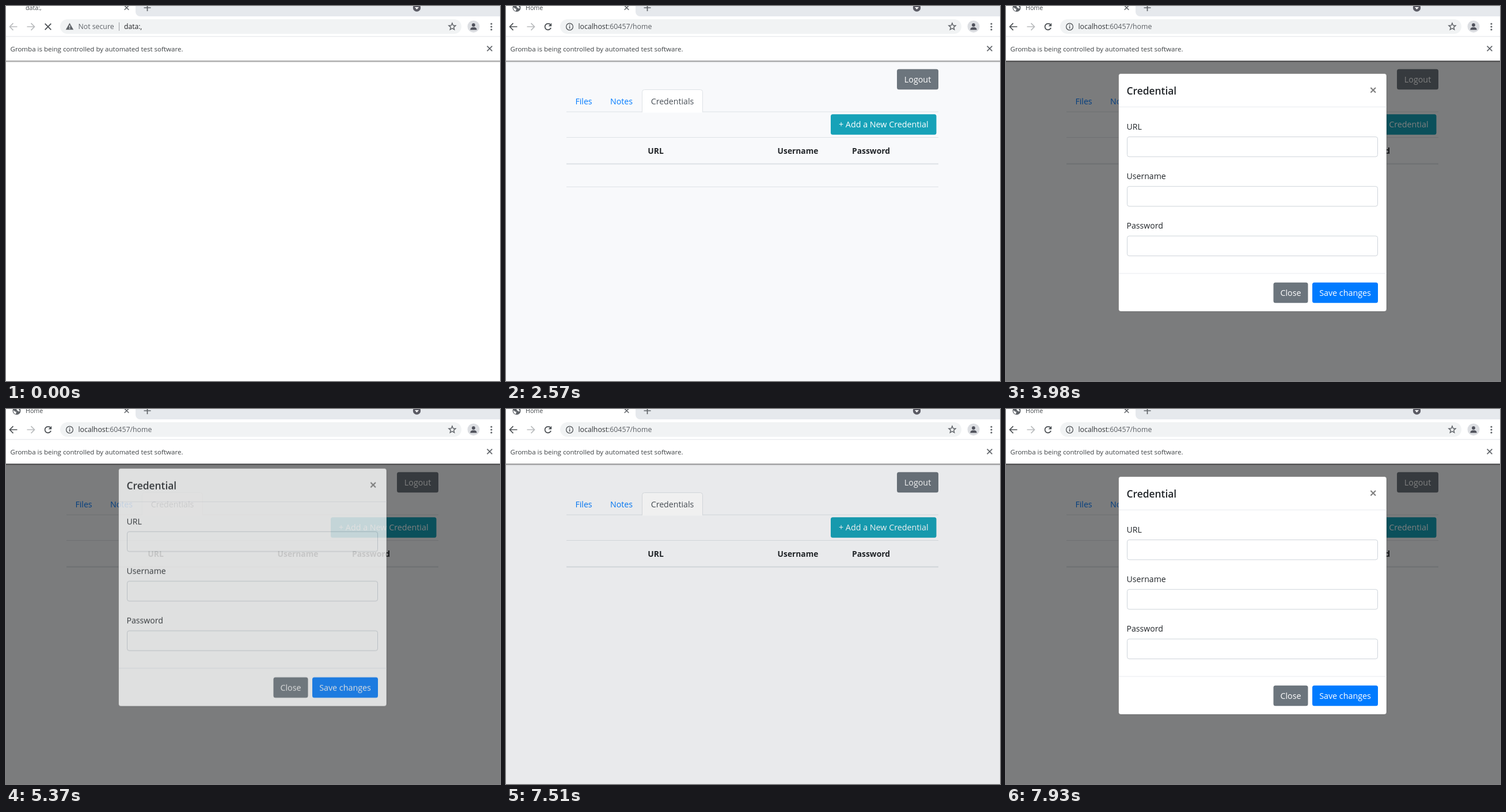
Animation of 858 by 652 pixels, one loop 8 s. Source, as an HTML page with a canvas:

```html
<!DOCTYPE html>
<html lang="en">
<head>
<meta charset="utf-8">
<title>Credentials test run</title>
<style>
html, body { margin: 0; width: 100%; height: 100%; overflow: hidden; background: #fff; }
canvas { display: block; }
</style>
</head>
<body>
<canvas id="stage" width="858" height="652"></canvas>
<script>
const c = document.getElementById('stage').getContext('2d');
const LOOP = 8000;
const FAMILY = '"Open Sans", "Noto Sans", sans-serif';
const INK = '#212529', ICON = '#5f6368', LINE = '#dee2e6', BLUE = '#007bff';

const clamp = v => Math.max(0, Math.min(1, v));
const easeOut = p => 1 - Math.pow(1 - p, 1.8);

function text(s, x, y, size = 14.3, color = INK, weight = 400, align = 'left') {
  c.font = `${weight} ${size}px ${FAMILY}`;
  c.fillStyle = color;
  c.textAlign = align;
  c.fillText(s, x, y);
}

function rect(x, y, w, h, color) {
  c.fillStyle = color;
  c.fillRect(x, y, w, h);
}

function box(x, y, w, h, r, fill, border) {
  c.beginPath();
  c.roundRect(x, y, w, h, r);
  if (fill) { c.fillStyle = fill; c.fill(); }
  if (border) { c.strokeStyle = border; c.lineWidth = 1; c.stroke(); }
}

function disc(x, y, r, color) {
  c.beginPath();
  c.arc(x, y, r, 0, 7);
  c.fillStyle = color;
  c.fill();
}

// Each path is a flat list: x, y, x, y, ...
function stroke(color, width, ...paths) {
  c.strokeStyle = color;
  c.lineWidth = width;
  c.beginPath();
  for (const p of paths)
    for (let i = 0; i < p.length; i += 2) c[i ? 'lineTo' : 'moveTo'](p[i], p[i + 1]);
  c.stroke();
}

function cross(x, y, r, width, color = ICON) {
  stroke(color, width, [x - r, y - r, x + r, y + r], [x - r, y + r, x + r, y - r]);
}

function button(label, x, y, w, color) {
  box(x, y, w, 35.5, 3.5, color);
  text(label, x + w / 2, y + 23, 14.3, '#fff', 400, 'center');
}

function field(x, y, w, focus) {
  if (focus) box(x - 3, y - 3, w + 6, 41.5, 6, 'rgba(0,123,255,.25)');
  box(x + .5, y + .5, w - 1, 34.5, 3.5, '#fff', focus ? '#80bdff' : '#ced4da');
}

function arrow(x, dir, color) {
  stroke(color, 1.7, [x - 6.5, 36, x + 6.5, 36], [x + dir * .5, 29.8, x + dir * 6.5, 36, x + dir * .5, 42.2]);
}

function globe() {
  disc(18.5, 3, 7, ICON);
  c.fillStyle = '#fff';
  c.beginPath();
  c.moveTo(13, 2);
  c.quadraticCurveTo(15, 5, 18, 5);
  c.lineTo(17, 9);
  c.quadraticCurveTo(12, 7, 13, 2);
  c.moveTo(18, 0);
  c.lineTo(22, 0);
  c.lineTo(24, 4);
  c.quadraticCurveTo(20, 5, 18, 0);
  c.fill();
}

function star(x, y) {
  c.beginPath();
  for (let i = 0; i < 10; i++) {
    const r = i % 2 ? 2.8 : 6.3, a = i * Math.PI / 5 - Math.PI / 2;
    c.lineTo(x + r * Math.cos(a), y + r * Math.sin(a));
  }
  c.closePath();
  c.strokeStyle = ICON;
  c.lineWidth = 1.4;
  c.stroke();
}

function browser(t) {
  const blank = t < 140, home = t >= 1610;
  const loading = t < 280 || (home && t < 2160);
  rect(0, 0, 858, 95, '#fff');

  // tab strip
  box(225, -12, 650, 30, [0, 0, 0, 8], '#e6e9ed');
  if (!loading) globe();
  text(blank ? 'data:,' : home ? 'Home' : 'Login', 34, 6.5, 10.7, '#45494d');
  cross(209.5, 3, 3.8, 1.5);
  stroke(ICON, 1.7, [239.5, 3, 251.5, 3], [245.5, -3, 245.5, 9]);
  disc(713.5, 3, 6.7, '#5b5b64');
  c.fillStyle = '#fff';
  c.beginPath();
  c.moveTo(710, 2); c.lineTo(717, 2); c.lineTo(713.5, 6);
  c.fill();

  // toolbar
  arrow(13, -1, blank ? '#babcbe' : '#4d5155');
  arrow(43, 1, '#babcbe');
  if (loading) cross(73, 36, 5.3, 1.8, '#4d5155');
  else {
    c.beginPath();
    c.arc(73, 36, 5.4, .35, 5.5);
    c.strokeStyle = '#4d5155';
    c.lineWidth = 1.8;
    c.stroke();
    c.fillStyle = '#4d5155';
    c.beginPath();
    c.moveTo(79.2, 29.5); c.lineTo(79.2, 35.2); c.lineTo(73.5, 35.2);
    c.fill();
  }
  box(94, 23, 697, 25.5, 12.7, '#f1f3f4');
  if (blank) {
    c.fillStyle = ICON;
    c.beginPath();
    c.moveTo(110.5, 29.5); c.lineTo(117.2, 41.3); c.lineTo(103.8, 41.3);
    c.fill();
    rect(109.8, 33.5, 1.5, 4, '#f1f3f4');
    rect(109.8, 38.6, 1.5, 1.4, '#f1f3f4');
    text('Not secure', 125.5, 40.3, 12.3, ICON);
    rect(196, 28.5, 1, 14.5, '#9a9da1');
    text('data:,', 205, 40.3, 12.1, '#202124');
  } else {
    c.beginPath();
    c.arc(110.5, 36, 5.9, 0, 7);
    c.strokeStyle = '#4d5155';
    c.lineWidth = 1.3;
    c.stroke();
    rect(109.8, 35, 1.5, 4.3, '#4d5155');
    rect(109.8, 32.4, 1.5, 1.5, '#4d5155');
    text('localhost', 125.5, 40.3, 12.3, '#303336');
    const w = c.measureText('localhost').width;
    text(home ? ':60457/home' : ':60457/login', 125.5 + w, 40.3, 12.3, '#5b5f64');
  }
  star(775, 36);
  disc(812, 35.7, 10.5, '#dcdee2');
  disc(812, 33, 2.9, '#50525c');
  box(806.3, 37, 11.4, 4.6, [5, 5, 0, 0], '#50525c');
  for (const y of [31, 36, 41]) disc(843, y, 1.6, ICON);

  // notice bar
  rect(0, 52.5, 858, 1, '#e2e4e7');
  text('Gromba is being controlled by automated test software.', 7.5, 78.7, 11.55, '#3c4043');
  cross(840, 74, 4.4, 1.6);
  ['.42', '.26', '.1', '.03'].forEach((a, i) => rect(0, 95 + i, 858, 1, `rgba(0,0,0,${a})`));
}

function login(t) {
  rect(0, 95, 858, 557, '#f8f9fb');
  rect(221.5, 186, 413, 330, '#eee');
  text('Login', 236.5, 236, 35, INK, 500);
  text('Username', 236.5, 270);
  field(236.5, 283.5, 383, t >= 350 && t < 490);
  if (t < 350) text('Enter Username', 249, 306.5, 14.3, '#6c757d');
  else text('testuser', 249, 306.5, 14.3, '#495057');
  text('Password', 236.5, 351);
  field(236.5, 364, 383, t >= 490 && t < 1540);
  if (t < 490) text('Enter Password', 249, 387, 14.3, '#6c757d');
  else {
    const n = Math.min(29, Math.floor((t - 490) / 70 + 1) * 15);
    for (let i = 0; i < n; i++) disc(252 + i * 6.13, 381.5, 1.9, '#495057');
    if (n === 29 && t < 1080) rect(428, 371, 1, 20, INK);
  }
  if (t >= 1540) box(233.5, 411.5, 68, 41.5, 6, 'rgba(0,123,255,.5)');
  button('Login', 236.5, 414.5, 62, BLUE);
  text('Click here to ', 236.5, 472, 14.3, '#dc3545');
  const w = c.measureText('Click here to ').width;
  text('sign up', 236.5 + w, 472, 14.3, BLUE);
}

function filesPane() {
  text('Upload a New', 135, 216);
  text('File:', 135, 238.5);
  box(241.5, 200.5, 82, 21, 2, '#efefef', '#767676');
  text('Choose File', 282, 215.5, 12.2, '#000', 400, 'center');
  text('No file chosen', 328, 215.5, 12.2);
  button('Upload', 545, 199, 73, '#343a40');
  rect(105, 267, 646, 1, LINE);
  rect(105, 312, 646, 2, LINE);
  text('#', 116, 295.5, 13.8, INK, 700);
  text('File Name', 245, 295.5, 13.8, INK, 700);
}

function credentialsPane(t) {
  if (t >= 3500 && t < 3780) box(561, 185.2, 189.5, 41.4, 6, 'rgba(23,162,184,.5)');
  button('+ Add a New Credential', 564, 188.2, 183.5, '#17a2b8');
  rect(105, 228, 646, 1, LINE);
  rect(105, 273.5, 646, 2, LINE);
  text('URL', 260, 256.7, 13.9, INK, 700, 'center');
  text('Username', 507, 256.7, 13.8, INK, 700, 'center');
  text('Password', 634, 256.7, 13.8, INK, 700, 'center');
  if (t < 3980) rect(105, 314, 646, 1, LINE);
}

function home(t) {
  rect(0, 95, 858, 557, '#f8f9fb');
  button('Logout', 679, 109.7, 72, '#6c757d');
  rect(105, 183.5, 646, 1, LINE);
  const active = t < 2160 ? 0 : 2;
  [['Files', 105, 60], ['Notes', 165, 71], ['Credentials', 236, 106]].forEach(([name, x, w], i) => {
    if (i === active) {
      box(x + .5, 145.5, w - 1, 39, [4, 4, 0, 0], '#fff', LINE);
      rect(x + 1, 183.5, w - 2, 2, '#fff');
    }
    text(name, x + w / 2, 170.6, 14.2, i === active ? '#495057' : BLUE, 400, 'center');
  });
  if (t < 2500) {
    c.globalAlpha = t < 2430 ? 1 : .4;
    filesPane();
  } else {
    c.globalAlpha = t < 2570 ? .5 : 1;
    credentialsPane(t);
  }
  c.globalAlpha = 1;
}

// The dialog is painted on its own layer so that it fades as one piece.
const layer = document.createElement('canvas');
layer.width = 858;
layer.height = 652;
function paintDialog() {
  const g = layer.getContext('2d');
  g.drawImage(c.canvas, 0, 0);
  c.clearRect(0, 0, 858, 652);
  box(195.5, 117.5, 465.5, 413.5, 4, '#fff', 'rgba(0,0,0,.25)');
  rect(196, 175, 465, 1, '#e9ecef');
  rect(196, 464.5, 465, 1, '#e9ecef');
  text('Credential', 209.5, 153.5, 17.4, INK, 600);
  cross(637.7, 146.3, 4.3, 2.1, '#7f7f7f');
  ['URL', 'Username', 'Password'].forEach((name, i) => {
    const y = 227 + i * 86.2;
    text(name, 209.5, y - 12, 14.1);
    field(210, y, 436, false);
  });
  button('Close', 464.5, 480.7, 60, '#6c757d');
  button('Save changes', 532, 480.7, 114, BLUE);
  g.clearRect(0, 0, 858, 652);
  g.drawImage(c.canvas, 0, 0);
}

const since = (t, start, phase) => Math.floor((t - start) / 70) * 70 + phase;

function overlay(t) {
  let shade, alpha, shift;
  if (t < 3500 || (t >= 5720 && t < 7510)) return;
  if (t >= 5370 && t < 5720) {
    const u = since(t, 5370, 42);
    alpha = clamp(1 - u / 175);
    shift = easeOut(clamp(u / 230));
    shade = .5 * clamp(1 - (u - 180) / 150);
  } else {
    const u = t < 5370 ? since(t, 3500, 64) : since(t, 7510, 18);
    shade = .5 * clamp(u / 150);
    alpha = clamp((u - 140) / 150);
    shift = 1 - easeOut(clamp((u - 140) / 295));
  }
  rect(0, 95, 858, 557, `rgba(0,0,0,${shade})`);
  c.globalAlpha = alpha;
  c.drawImage(layer, 0, -47 * shift);
  c.globalAlpha = 1;
}

function draw(t) {
  rect(0, 0, 858, 652, '#fff');
  if (t >= 210 && t < 1680) login(t);
  if (t >= 1680) {
    home(t);
    overlay(t);
  }
  browser(t);
}

function frame() {
  draw(performance.now() % LOOP);
  requestAnimationFrame(frame);
}

paintDialog();
frame();
</script>
</body>
</html>
```
